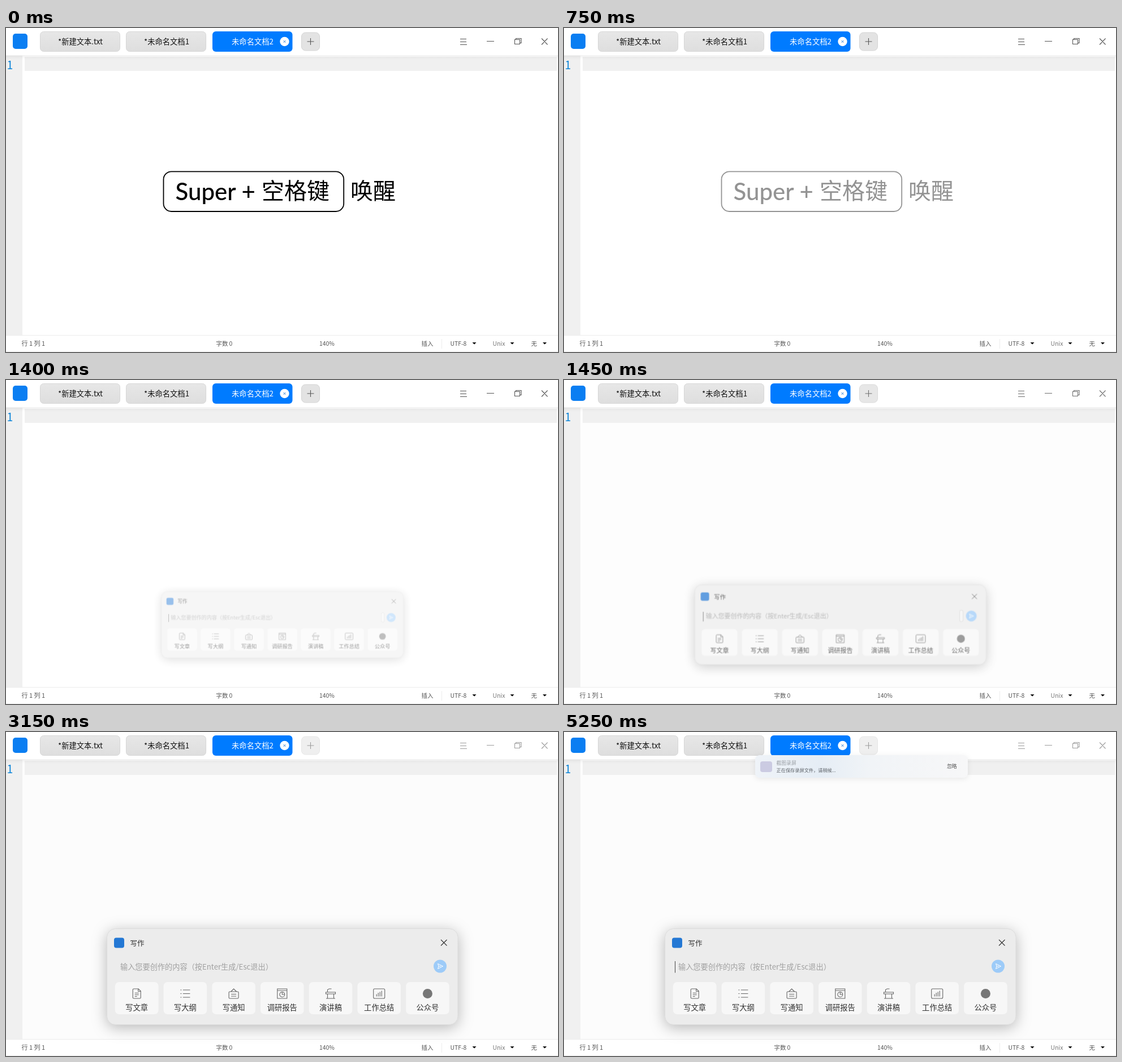
Animation, 976 px wide and 574 px high, one loop 5.3 s. Source, as an HTML page:

```html
<!DOCTYPE html>
<html lang="zh-CN">
<head>
<meta charset="utf-8">
<title>写作</title>
<style>
  html, body { margin: 0; width: 100%; height: 100%; overflow: hidden; background: #fff; }
  svg { display: block; width: 976px; height: 574px; }
  text { font-family: "Noto Sans CJK SC", "Noto Sans CJK", "Noto Sans", sans-serif; white-space: pre; }
  .line { fill: none; stroke: #555; stroke-width: 1.1; }
  .mid { text-anchor: middle; }
  .tab { fill: url(#tabFill); stroke: #d6d6d6; }
  .tabs text { font-size: 13.3px; fill: #111; }
  .status text { font-size: 10.4px; fill: #555; }
  .status path { fill: none; stroke: #555; stroke-width: 1.5; }
  .hint text { font-size: 40px; }
  .hint .latin { font: 500 42px Lato, "Noto Sans", sans-serif; }
  .cards rect { fill: #f7f7f7; }
  .cards text { font-size: 13.3px; fill: #303030; }
  .cards path, .cards circle { fill: none; stroke: #666; stroke-width: 1.1; }
  .cards .mark { fill: #777; stroke: none; }
  .shadow { filter: drop-shadow(0 5px 13px rgba(0, 0, 0, .27)); }
  .soft { filter: drop-shadow(0 2px 5px rgba(0, 0, 0, .08)); }

  .anim { animation: 5300ms step-end infinite; }
  .hint { animation-name: fade; }
  .panel { animation-name: open; transform-origin: 488.8px 433.3px; }
  .caret { animation-name: blink; }
  .scroll { animation-name: vanish; }
  .controls { animation-name: dim; }
  .shade { animation-name: shade; }
  .notice { animation-name: notify; }

  @keyframes fade {
    0% { opacity: 1; animation-timing-function: steps(26, end); }
    24.52%, 100% { opacity: 0; }
  }
  @keyframes open {
    0% { opacity: 0; transform: scale(.5); }
    24.52% { opacity: .08; transform: scale(.52); }
    25.47% { opacity: .26; transform: scale(.59); }
    26.41% { opacity: .47; transform: scale(.689); }
    27.35% { opacity: .72; transform: scale(.83); }
    28.3% { opacity: .93; transform: scale(.95); }
    29.24%, 100% { opacity: 1; transform: none; }
  }
  @keyframes blink {
    0%, 48.11%, 70.75%, 93.39%, 100% { opacity: 1; }
    36.79%, 59.43%, 82.07% { opacity: 0; }
  }
  @keyframes vanish {
    0% { opacity: 1; }
    46.22% { opacity: .5; }
    48.11% { opacity: .15; }
    59.43%, 100% { opacity: 0; }
  }
  @keyframes dim {
    0% { opacity: 1; }
    27.35% { opacity: .85; }
    28.3% { opacity: .7; }
    29.24%, 100% { opacity: .58; }
  }
  @keyframes shade {
    0% { opacity: 0; }
    27.35% { opacity: .5; }
    28.3%, 100% { opacity: 1; }
  }
  @keyframes notify {
    0% { opacity: 0; }
    99.05%, 100% { opacity: 1; }
  }
</style>
</head>
<body>
<svg viewBox="0 0 976 574">
  <defs>
    <linearGradient id="tabFill" x2="0" y2="1">
      <stop stop-color="#e7e7e7"/><stop offset="1" stop-color="#dedede"/>
    </linearGradient>
    <linearGradient id="barShadow" x2="0" y2="1">
      <stop stop-color="#000" stop-opacity=".055"/><stop offset="1" stop-color="#000" stop-opacity="0"/>
    </linearGradient>
    <linearGradient id="noticeFill">
      <stop stop-color="#eff3f8"/><stop offset=".3" stop-color="#e5edf5"/>
      <stop offset=".55" stop-color="#f1f4f7"/><stop offset="1" stop-color="#f7f7f8"/>
    </linearGradient>
    <path id="chevron" d="M0 0l3.5 3.5L7 0"/>
  </defs>

  <!-- editor -->
  <rect width="976" height="574" fill="#fff"/>
  <rect class="anim shade" x="29" y="49" width="947" height="496" fill="#fcfcfc"/>
  <rect y="49" width="29" height="495" fill="#f0f0f0"/>
  <rect x="33" y="51" width="941" height="25" fill="#f0f0f0"/>
  <rect y="48" width="976" height="8" fill="url(#barShadow)"/>
  <text x="2" y="73" fill="#0a84d8" style="font:20px 'Noto Sans Mono CJK SC','Noto Sans CJK SC',monospace">1</text>

  <!-- title bar -->
  <rect x="12" y="10" width="26" height="27" rx="5" fill="#0a7ef2"/>
  <g class="tabs">
    <rect class="tab" x="60.5" y="6.5" width="141" height="35" rx="6"/>
    <rect class="tab" x="212.5" y="6.5" width="141" height="35" rx="6"/>
    <rect x="365" y="6" width="141.500" height="36" rx="6" fill="#007bff"/>
    <text class="mid" x="131.500" y="29">*新建文本.txt</text>
    <text class="mid" x="284" y="29">*未命名文档1</text>
    <text class="mid" x="436" y="29" style="fill:#fff">未命名文档2</text>
    <circle cx="492.500" cy="24" r="8.200" fill="#fff"/>
    <path d="M490.500 22l4 4m0-4l-4 4" stroke="#3a86d8" fill="none"/>
  </g>
  <g class="anim controls">
    <rect x="522.500" y="8" width="32" height="32" rx="7" fill="#e3e3e3" stroke="#d4d4d4"/>
    <path class="line" d="M532.500 24h12m-6-6v12"/>
    <path class="line" d="M803 19.500h11M803 24.500h11M803 29.500h12M850 23.500h13M947 18.500l10.500 11m0-11l-10.500 11"/>
    <path class="line" d="M899.500 20.500h9v8h-9zM901.500 20.500v-2h9.500v8h-2.500"/>
  </g>

  <!-- status bar -->
  <g class="status">
    <rect y="545" width="976" height="29" fill="#fff"/>
    <path d="M0 544.500h976M0 573.500h976M770.500 551v17" style="stroke:#ececec;stroke-width:1"/>
    <text x="27.500" y="563" style="font-size:11px">行 1 列 1</text>
    <text x="371.500" y="563">字数 0</text>
    <text x="554" y="563">140%</text>
    <text x="734.500" y="563">插入</text>
    <text x="785.500" y="563">UTF-8</text>
    <text x="860.500" y="563" style="fill:#777">Unix</text>
    <text x="928.500" y="563">无</text>
    <use href="#chevron" x="824.500" y="557"/>
    <use href="#chevron" x="891.500" y="557"/>
    <use href="#chevron" x="949" y="557"/>
  </g>

  <!-- shortcut hint -->
  <g class="anim hint">
    <rect x="278.500" y="254.300" width="318.700" height="70.700" rx="14" fill="none" stroke="#000" stroke-width="1.800"/>
    <text class="latin" x="299.500" y="305">Super</text>
    <text class="latin" x="416.500" y="305">+</text>
    <text x="452" y="303">空格键</text>
    <text x="609" y="303">唤醒</text>
  </g>

  <!-- writing panel -->
  <g class="anim panel">
    <rect class="shadow" x="178.500" y="348.500" width="620.500" height="170" rx="15" fill="#ececec" stroke="#dcdcdc"/>
    <rect x="191" y="364.500" width="18" height="18" rx="4" fill="#2478d4"/>
    <text x="219.500" y="378.500" font-size="12.500" fill="#333">写作</text>
    <path class="line" d="M769 368l10.500 10.500m0-10.500l-10.500 10.500" style="stroke:#333"/>
    <path class="anim caret" d="M196.500 406v20.500" stroke="#444"/>
    <text x="202" y="420.500" font-size="13.200" fill="#a0a0a0">输入您要创作的内容（按Enter生成/Esc退出）</text>
    <rect class="anim scroll" x="742.500" y="402.500" width="7.500" height="24.500" rx="3.500" fill="#f3f3f3" stroke="#cfcfcf"/>
    <circle cx="767.500" cy="415" r="11.500" fill="#9dcbf8"/>
    <path d="M763.500 410.500l9 4.500-9 4.500 1.500-4.500zM765 415h4" fill="none" stroke="#fff"/>
    <g class="cards" id="cards"></g>
  </g>

  <!-- notification -->
  <g class="anim notice">
    <rect class="soft" x="338" y="41" width="376" height="40" rx="8" fill="url(#noticeFill)"/>
    <rect x="347" y="52" width="21" height="19" rx="4" fill="#cbcbe2"/>
    <text x="375.500" y="57.500" font-size="8.800" fill="#9a9fa5">截图录屏</text>
    <text x="375.500" y="70.500" font-size="8.200" fill="#5d6268">正在保存录屏文件，请稍候...</text>
    <text x="677" y="64" font-size="8.900" fill="#555">忽略</text>
  </g>
</svg>
<script>
  // Icons are drawn around their own centre.
  const cards = [
    ['写文章', '<path d="M-5-8.500h8l4 4V7q0 1.500-1.500 1.500h-10.500Q-7 8.500-7 7V-7q0-1.500 2-1.500zM2.500-8.500v4.500h4.500M-3.500-1h7M-3.500 2h7M-3.500 5h4"/>'],
    ['写大纲', '<path d="M-8.500-6.500h2M-8.500 0h2M-8.500 6.500h2M-4-6.500H8.500M-4 0H8.500M-4 6.500H8.500"/>'],
    ['写通知', '<path d="M-7-3.500H7q1.500 0 1.500 1.500V7Q8.500 8.500 7 8.500H-7Q-8.500 8.500-8.500 7V-2q0-1.500 1.500-1.500zM-5-3.500L0-8.500 5-3.500M-4.500 1h9M-4.500 4.500h9"/>'],
    ['调研报告', '<path d="M-8.500-8.500h17v17h-17zM-8.500-5.500h17M0-2.500V1.500H4"/><circle cy="1.500" r="4.500"/>'],
    ['演讲稿', '<path d="M-8.500-2.500h17v3h-17zM-5.500.5v8M5.500.5v8M-8 8.500H8M-5.500-2.500v-4.500l3-1.500h4"/>'],
    ['工作总结', '<path d="M-8-8.500H8q2 0 2 2v13q0 2-2 2H-8q-2 0-2-2v-13q0-2 2-2zM-4.500 5V1M-1.500 5V-1.500M1.500 5V-3M4.500 5V-5"/>'],
    ['公众号', '<circle class="mark" r="8.500"/>']
  ];
  document.getElementById('cards').innerHTML = cards.map(([label, icon], i) =>
    `<g transform="translate(${231.2 + i * 85.7} 463.500)">
      <rect x="-38.300" y="-20.500" width="76.600" height="57" rx="7"/>
      ${icon}<text class="mid" y="29.800">${label}</text>
    </g>`).join('');
</script>
</body>
</html>
```
